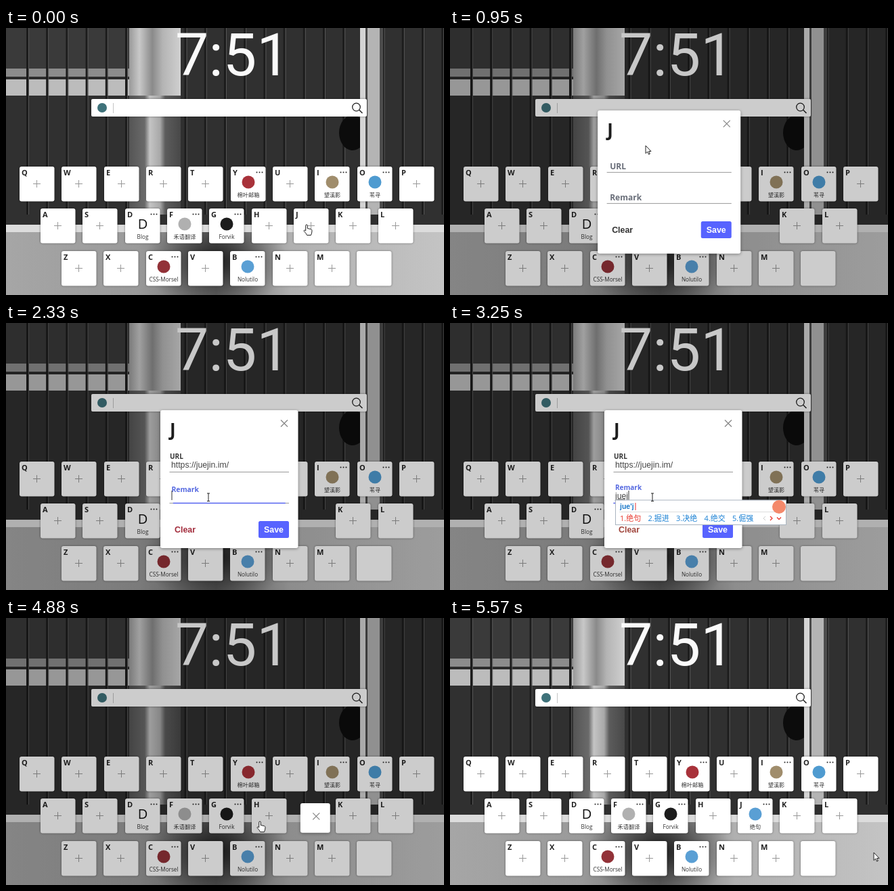
An HTML page that plays this animation: 647x395 px, repeating every 5800 ms.

```html
<!DOCTYPE html>
<html lang="zh">
<head>
<meta charset="utf-8">
<title>Keyboard start page</title>
<style>
  html, body { margin: 0; width: 100%; height: 100%; overflow: hidden; background: #2c2c2c; }
  svg { display: block; }
  text { font-family: "Open Sans", "Noto Sans CJK SC", "Noto Sans CJK", sans-serif; white-space: pre; }
  .clock { font-family: Roboto, Arial, sans-serif; }
  .arial { font-family: "Liberation Sans", Arial, "Noto Sans CJK SC", "Noto Sans CJK", sans-serif; }
  .bold { font-weight: 700; }
  .tile { filter: drop-shadow(0 0 1.5px rgba(0, 0, 0, .45)); }
  .card { filter: drop-shadow(0 1px 2px rgba(0, 0, 0, .4)); }
</style>
</head>
<body>
<svg width="647" height="395" viewBox="0 0 647 395">
  <defs>
    <linearGradient id="post">
      <stop offset="0" stop-color="#999"/><stop offset=".2" stop-color="#c8c8c8"/>
      <stop offset=".45" stop-color="#8a8a8a"/><stop offset=".65" stop-color="#b4b4b4"/>
      <stop offset="1" stop-color="#d0d0d0"/>
    </linearGradient>
    <linearGradient id="pillar">
      <stop offset="0" stop-color="#555"/><stop offset=".3" stop-color="#6a6a6a"/>
      <stop offset=".4" stop-color="#c4c4c4"/><stop offset=".6" stop-color="#a8a8a8"/>
      <stop offset=".7" stop-color="#5c5c5c"/><stop offset="1" stop-color="#484848"/>
    </linearGradient>
    <linearGradient id="wall">
      <stop offset="0" stop-color="#a6a6a6"/><stop offset=".3" stop-color="#9a9a9a"/>
      <stop offset=".48" stop-color="#6c6c6c"/><stop offset=".65" stop-color="#b0b0b0"/>
      <stop offset="1" stop-color="#c4c4c4"/>
    </linearGradient>
    <radialGradient id="shade">
      <stop offset="0" stop-color="#161616" stop-opacity=".95"/><stop offset="1" stop-color="#333" stop-opacity="0"/>
    </radialGradient>
  </defs>
  <g id="photo"></g>
  <g id="page"></g>
  <g id="live"></g>
</svg>
<script>
const $ = id => document.getElementById(id);
const rect = (x, y, w, h, fill, more = '') =>
  `<rect x="${x}" y="${y}" width="${w}" height="${h}" fill="${fill}" ${more}/>`;
const text = (x, y, size, fill, str, more = '') =>
  `<text x="${x}" y="${y}" font-size="${size}" fill="${fill}" ${more}>${str}</text>`;
const line = (d, stroke, width = 1) =>
  `<path d="${d}" fill="none" stroke="${stroke}" stroke-width="${width}"/>`;
const dot = (x, y, r, fill) => `<circle cx="${x}" cy="${y}" r="${r}" fill="${fill}"/>`;
const BOLD = 'class="bold"', ARIAL = 'class="arial"', ARIAL_BOLD = 'class="arial bold"';
const MID = 'text-anchor="middle"';

// Barred window behind the page
function photo() {
  let s = rect(0, 0, 647, 300, '#303030') + rect(0, 0, 182, 60, '#3a3a3a') +
    rect(0, 60, 188, 12, '#8c8c8c') + rect(0, 72, 188, 4, '#2c2c2c') + rect(0, 76, 188, 24, '#bcbcbc');
  for (let x = 30; x < 647; x += 29.2) {
    s += rect(x, 0, 3, 290, '#1c1c1c') + rect(x + 3, 0, 1, 290, '#565656');
  }
  return s + rect(182, 0, 76, 100, 'url(#post)') + rect(182, 100, 76, 190, 'url(#pillar)') +
    '<ellipse cx="512" cy="155" rx="20" ry="26" fill="#0c0c0c"/>' +
    rect(523, 0, 8, 290, '#d4d4d4') + rect(531, 0, 3, 290, '#4a4a4a') +
    rect(534, 0, 18, 290, '#b4b4b4') + rect(552, 0, 5, 290, '#4c4c4c') +
    rect(0, 276, 647, 16, '#303030') + rect(0, 292, 647, 103, 'url(#wall)') +
    '<ellipse cx="310" cy="345" rx="105" ry="75" fill="url(#shade)"/>' +
    rect(0, 291, 647, 11, '#dcdcdc');
}

const rows = [['QWERTYUIOP', 20, 205], ['ASDFGHJKL', 51, 267], ['ZXCVBNM ', 82, 330]];
const sites = {
  Y: ['棉叶邮箱', '#a8323a'], I: ['望溪影', '#a08d6c'], O: ['苇寻', '#4f9bd0'],
  D: ['Blog'], F: ['禾语翻译', '#b0b0b0'], G: ['Forvik', '#1c1c1c'],
  C: ['CSS-Morsel', '#923238'], B: ['Nolutilo', '#5a9fd4']
};
const added = ['绝句', '#5a9fd4'];

function tile(key, x, y, site) {
  let s = rect(x, y, 51.5, 51.5, '#fff', 'rx="3" class="tile"') + text(x + 3, y + 13, 11, '#222', key, BOLD);
  if (site) {
    const [name, color] = site;
    s += color ? dot(x + 26, y + 23, 9.5, color) : text(x + 26, y + 30, 20, '#111', 'D', MID);
    for (const i of [0, 1, 2]) s += dot(x + 38.5 + i * 4, y + 8.5, 1, '#222');
    s += text(x + 26, y + 45, 8.2, '#333', name, MID);
  } else if (key !== ' ') {
    s += line(`M${x + 20} ${y + 25.5}h11m-5.5-5.5v11`, '#999');
  }
  return s;
}

function page(jSite, hideJ) {
  let s = text(250, 70, 88, '#fafafa', '7:51', 'class="clock"') +
    rect(126, 105, 407, 26, '#fff', 'rx="2" class="tile"') +
    dot(142, 118, 7, '#3f727a') + rect(158, 111, 1, 15, '#c4c4c4') +
    '<circle cx="517.5" cy="117" r="5.8" fill="none" stroke="#222" stroke-width="1.3"/>' +
    line('M521.7 121.2l4.8 4.8', '#222', 1.5);
  for (const [keys, x0, y] of rows) {
    [...keys].forEach((key, i) => {
      if (key === 'J' && hideJ) return;
      s += tile(key, Math.round(x0 + i * 62.33), y, key === 'J' ? jSite : sites[key]);
    });
  }
  return s;
}

const cursors = {
  hand: ['M-1.3 9V1.2Q-1.3 0 0 0T1.3 1.2V5.5L6.4 6.6Q8 7 8 8.8 8 12 6.5 15.5H.5Q-1 12-3.8 9.6-4.2 8-2.8 8Z', '#fff'],
  arrow: ['M0 0V11.5L2.7 9 4.5 13 6.3 12.2 4.6 8.4H8Z', '#fff'],
  beam: ['M-2-6H2M0-6V5.5M-2 5.5H2', 'none']
};

function cursor([kind, x, y]) {
  const [d, fill] = cursors[kind];
  return `<path d="${d}" transform="translate(${x} ${y})" fill="${fill}" stroke="#222" stroke-width="1"/>`;
}

// Card grows from the J tile (p = 0) to full size (p = 1), overshooting both ends
const from = [425, 267, 476.5, 318.5], to = [228, 129, 431.5, 333];

function dialog(st) {
  const [l, t, r, b] = from.map((v, i) => v + (to[i] - v) * st.p);
  const w = r - l, h = b - t;
  let s = line(`M${w - 25.5} 14.5l10 10m0-10l-10 10`, '#888', 1.3);
  if (st.p > .2) {
    s += text(14, 38, 26, '#1c1c1c', 'J', BOLD) +
      field('URL', 91.5, w, st.url, 0) + field('Remark', 137.5, w, st.remark, 2) +
      text(21, 180.5, 12.4, st.clear, 'Clear', ARIAL_BOLD) +
      rect(w - 58.5, 164, 45, 25, st.save, 'rx="2.5"') +
      text(w - 50.5, 180.5, 12.4, '#fff', 'Save', ARIAL_BOLD);
  }
  return rect(l, t, w, h, '#fff', 'rx="3" class="card"') +
    `<svg x="${l}" y="${t}" width="${w}" height="${h}">${s}</svg>`;
}

// lift: 0 label resting, 1 floated; bar: blue underline as [start, end] fractions
function field(name, y, w, { lift = 0, value = '', caret, bar, tone, ime }, dx) {
  const color = tone || (lift ? '#333' : '#686d78');
  let s = line(`M13.5 ${y}H${w - 13.5}`, '#999');
  if (bar) {
    const span = w - 27;
    s += line(`M${13.5 + span * bar[0]} ${y}H${13.5 + span * bar[1]}`, '#5563f0', 1.3);
  }
  s += text(18 - (4 - dx) * lift, y - 4.5 - 15 * lift, 12 - 2 * lift, color, name, BOLD);
  s += text(16, y - 7, 12.25, '#444', value, ARIAL + (ime ? ' text-decoration="underline"' : ''));
  if (caret !== undefined) s += rect(16.5 + caret, y - 18.5, 1, 14, '#333');
  return s;
}

function popup({ typed, words, pitch, right }) {
  let s = rect(244.5, 262, right - 245, 36.5, '#fff', 'stroke="#a9b4c0"') +
    line(`M250 279.5H${right - 6}`, '#ddd') +
    text(251, 274.5, 10.5, '#1a78c8', typed, ARIAL_BOLD) +
    rect(252 + typed.length * 4.3, 266, 1, 11, '#e33');
  words.split(' ').forEach((word, i) => {
    s += text(251 + i * pitch, 293, 11, i ? '#1a80d4' : '#e8392f', `${i + 1}.${word}`);
  });
  return s + line(`M${right - 31} 286l-3 3 3 3`, '#ccc') +
    line(`M${right - 24} 286l3 3-3 3`, '#e8392f', 1.3) +
    line(`M${right - 14} 287.5l3 3 3-3`, '#e8392f', 1.3) +
    dot(right - 11, 272, 10, '#f4896b');
}

const BLUE = '#5468e0', ADDRESS = 'https://juejin.im/', FULL = [0, 1];
const filled = { lift: 1, value: ADDRESS };
const typing = (value, caret) => ({ lift: 1, value, caret, bar: FULL, tone: BLUE, ime: true });

// Each step keeps whatever it does not mention
const steps = [
  [0, { p: null, dim: false, cur: ['hand', 444, 291], url: {}, remark: {}, clear: '#333', save: '#5763ff' }],
  [230, { cur: ['hand', 444, 290] }],
  [470, { p: -.05, dim: true }],
  [700, { p: .52, cur: ['hand', 448, 290] }],
  [950, { p: 1.05, cur: ['arrow', 289, 174] }],
  [1180, { p: 1 }],
  [1410, { cur: ['beam', 292, 207] }],
  [1640, { url: { lift: 1, caret: 0, bar: FULL, tone: BLUE } }],
  [1870, { url: { ...filled, caret: 85, bar: FULL, tone: BLUE }, clear: '#a22c3c', cur: ['beam', 299, 251] }],
  [2100, { cur: ['beam', 299, 258] }],
  [2330, { url: filled, remark: { lift: .8, caret: 0, bar: [.03, .97], tone: BLUE } }],
  [2560, { remark: { lift: 1, caret: 0, bar: FULL, tone: BLUE } }],
  [2790, { remark: { lift: 1, bar: FULL, tone: BLUE } }],
  [3020, { remark: typing('j', 3), ime: { typed: 'j', words: '就 将 及 见 进', pitch: 29, right: 443 } }],
  [3250, { remark: typing('juej', 19), clear: '#a0453c',
    ime: { typed: "jue'j", words: '绝句 掘进 决绝 绝交 倔强', pitch: 41.5, right: 497 } }],
  [3480, { remark: typing('jueju', 26), ime: { typed: "jue'ju", words: '绝句 决 觉 绝 掘', pitch: 34, right: 464 } }],
  [3730, { remark: { lift: 1, value: added[0], caret: 24, bar: FULL, tone: BLUE }, ime: null }],
  [3960, { cur: ['beam', 309, 259] }],
  [4190, { remark: { lift: 1, value: added[0], bar: FULL, tone: BLUE }, cur: ['arrow', 352, 287] }],
  [4420, { remark: { lift: 1, value: added[0], bar: [.27, .73], tone: BLUE }, clear: '#733a40',
    save: '#4347c6', cur: ['hand', 394, 303] }],
  [4650, { p: .765, remark: { lift: 1, value: added[0] } }],
  [4880, { p: -.05, cur: ['hand', 375, 301] }],
  [5110, { p: null, dim: false, saved: true, cur: ['hand', 363, 301] }],
  [5570, { cur: ['arrow', 626, 347] }]
];
const states = [];
steps.forEach(([, change], i) => states.push({ ...states[i - 1], ...change }));

function draw(st) {
  const open = st.p !== null;
  $('page').innerHTML = page(st.saved && added, open);
  $('live').innerHTML = (st.dim ? rect(0, 0, 647, 395, '#000', 'opacity=".2"') : '') +
    (open ? dialog(st) : '') + (st.ime ? popup(st.ime) : '') + cursor(st.cur);
}

let shown = -1;
function tick() {
  const now = performance.now() % 5800;
  const i = steps.filter(([at]) => at <= now).length - 1;
  if (i !== shown) draw(states[shown = i]);
  requestAnimationFrame(tick);
}
$('photo').innerHTML = photo();
tick();
</script>
</body>
</html>
```
